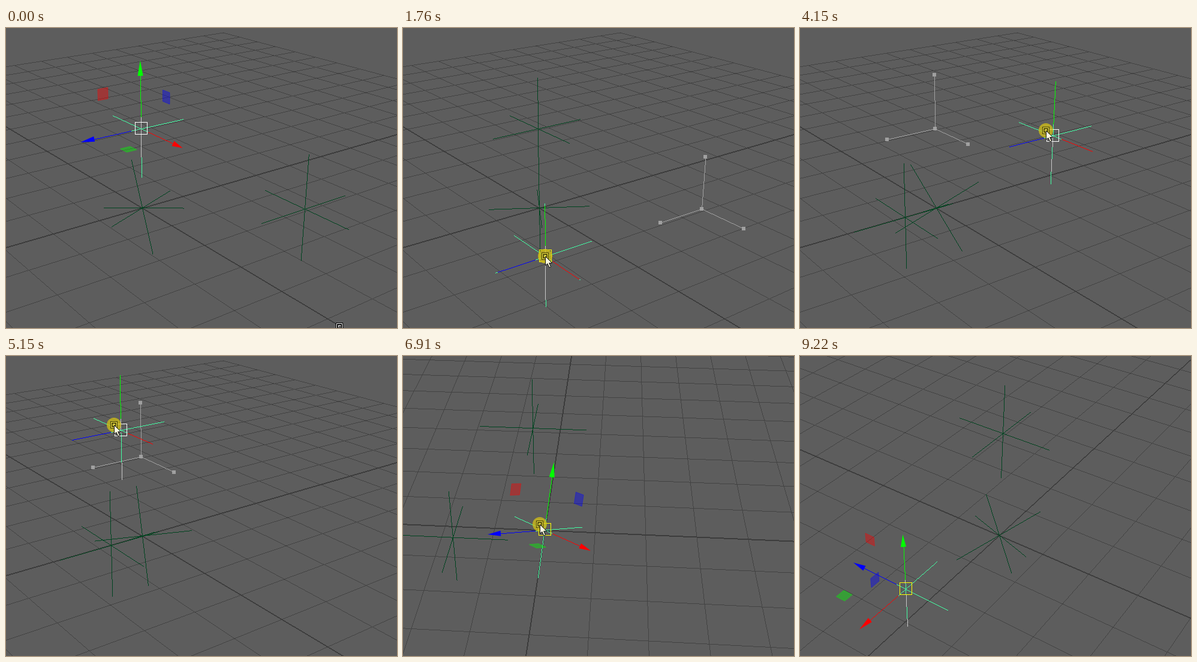
An HTML page with a canvas that plays this animation: 652x501 px, repeating every 9.6 s.

```html
<!DOCTYPE html>
<html>
<head>
<meta charset="utf-8">
<style>
html, body { margin: 0; width: 100%; height: 100%; overflow: hidden; background: #5d5d5d; }
canvas { display: block; }
</style>
</head>
<body>
<canvas id="stage" width="652" height="501"></canvas>
<script>
const W = 652, H = 501, LOOP = 9600, STEP = 76.8;
const FOCAL = 1325, CX = 260, CY = 250, DIST = 15.8, NEAR = 0.5, GIZMO = 0.0875;
const ctx = document.getElementById('stage').getContext('2d');
const image = ctx.createImageData(W, H);
const pixels = new Uint32Array(image.data.buffer);

const rgb = (r, g, b) => (255 << 24 | b << 16 | g << 8 | r) >>> 0;
const BACK = rgb(93, 93, 93), GRID = rgb(67, 67, 67), AXIS = rgb(60, 60, 60);
const DORMANT = rgb(0, 68, 32), ACTIVE = rgb(67, 255, 163), PALE = rgb(200, 200, 200);
const WHITE = rgb(255, 255, 255), GHOST = rgb(160, 160, 160);
const AXIS_RGB = ['255,0,0', '0,255,0', '0,0,255'];
const AXIS_PIXEL = [rgb(255, 0, 0), rgb(0, 255, 0), rgb(0, 0, 255)];
const WORLD = [[1, 0, 0], [0, 1, 0], [0, 0, 1]];
const ORIGIN = [0, 0, 0];

// Time, yaw, pitch, screen position of the world origin
const CAMERA = [
  [5800, 35.5, 22.2, 227, 300], [6370, 11.45, 33, 213, 293], [6560, 8, 33.4, 216, 293],
  [6640, 8, 33.4, 216, 293], [7420, -35.7, 36.2, 287, 284], [7680, -35.7, 36.2, 287, 284],
  [8000, -35.7, 36.2, 332, 299]
];
const TARGET_PATH = [
  [910, 498, 302], [1010, 465, 310], [1200, 300, 345], [1400, 102, 370], [1600, 180, 390],
  [1760, 282, 368], [1850, 322, 338], [2100, 366, 250], [2300, 300, 170], [2550, 150, 200],
  [2700, 108, 270], [2840, 175, 316]
];
const TARGET_PATH_2 = [
  [8300, 158, 260], [8500, 146, 262], [8700, 150, 330], [8900, 176, 389]
];
const UP_PATH = [
  [3880, 225, 168], [4000, 424, 180], [4130, 424, 180], [4460, 95, 130], [4600, 95, 130],
  [4870, 362, 105], [5150, 191, 124], [5350, 184, 134], [5520, 191, 127]
];
const CURSOR_PATH = [
  [0, 556, 498], [640, 498, 302], [900, 498, 302], [3080, 175, 316], [3600, 214, 159],
  [3880, 214, 159], [5550, 180, 118], [5750, 250, 268], [5820, 250, 268], [6370, 353, 288],
  [6500, 362, 290], [6630, 190, 270], [7420, 320, 309], [7680, 320, 309], [8000, 365, 324],
  [8130, 158, 260], [8300, 158, 260], [8960, 176, 389], [9220, 600, 530]
];
const PRESSED = [[640, 720], [900, 3080], [3700, 3780], [3880, 5550], [5800, 6500],
  [6620, 7440], [7600, 8020], [8130, 8200], [8300, 8960]];

const within = (t, a, b) => t >= a && t < b;
const add = (p, q, k = 1) => p.map((v, i) => v + q[i] * k);
const dot = (p, q) => p[0] * q[0] + p[1] * q[1] + p[2] * q[2];
const unit = p => p.map(v => v / Math.hypot(...p));
const cross = (p, q) => [p[1] * q[2] - p[2] * q[1], p[2] * q[0] - p[0] * q[2], p[0] * q[1] - p[1] * q[0]];

// Monotone cubic interpolation through timed keys
function track(keys, t) {
  const last = keys.length - 1;
  if (t <= keys[0][0]) return keys[0].slice(1);
  if (t >= keys[last][0]) return keys[last].slice(1);
  const i = keys.findIndex(k => k[0] > t) - 1;
  const span = keys[i + 1][0] - keys[i][0], u = (t - keys[i][0]) / span;
  const slope = (n, c) => (keys[n + 1][c] - keys[n][c]) / (keys[n + 1][0] - keys[n][0]);
  const tangent = (n, c) => {
    if (n === 0 || n === last) return 0;
    const a = slope(n - 1, c), b = slope(n, c);
    return a * b > 0 ? 2 * a * b / (a + b) : 0;
  };
  return keys[i].slice(1).map((a, n) => {
    const c = n + 1, b = keys[i + 1][c];
    const ease = u * u * (3 - 2 * u);
    return a + (b - a) * ease + span * u * (1 - u) *
      (tangent(i, c) * (1 - u) - tangent(i + 1, c) * u);
  });
}

function cameraAt(t) {
  const [yaw, pitch, x, y] = track(CAMERA, t), rad = Math.PI / 180;
  return {
    cy: Math.cos(yaw * rad), sy: Math.sin(yaw * rad),
    cp: Math.cos(pitch * rad), sp: Math.sin(pitch * rad),
    ox: (x - CX) / FOCAL * DIST, oy: (CY - y) / FOCAL * DIST
  };
}

function toView(cam, [x, y, z]) {
  const ahead = -cam.cy * x - cam.sy * z;
  return [cam.sy * x - cam.cy * z + cam.ox,
    cam.sp * ahead + cam.cp * y + cam.oy,
    cam.cp * ahead - cam.sp * y + DIST];
}

const toScreen = ([x, y, d]) => [CX + FOCAL * x / d, CY - FOCAL * y / d];
const project = (cam, p) => toScreen(toView(cam, p));

function unproject(cam, [sx, sy], depth) {
  const right = (sx - CX) / FOCAL * depth - cam.ox;
  const up = (CY - sy) / FOCAL * depth - cam.oy;
  const front = depth - DIST;
  const ahead = cam.cp * front + cam.sp * up;
  return [-cam.cy * ahead + cam.sy * right, cam.cp * up - cam.sp * front,
    -cam.sy * ahead - cam.cy * right];
}

const HOME = cameraAt(0), CLOSE = cameraAt(LOOP);
const targetAt = t => t < 8300
  ? unproject(HOME, track(TARGET_PATH, t), 13.7)
  : unproject(CLOSE, track(TARGET_PATH_2, t), 15.235);
const upAt = t => unproject(HOME, track(UP_PATH, t), 15.15);

function put(x, y, color) {
  if (x >= 0 && y >= 0 && x < W && y < H) pixels[y * W + x] = color;
}

// Aliased line; even and odd pixel columns may differ in tone
function line([x0, y0], [x1, y1], even, odd = even) {
  const steep = Math.abs(y1 - y0) > Math.abs(x1 - x0);
  if (steep) [x0, y0, x1, y1] = [y0, x0, y1, x1];
  if (x0 > x1) [x0, y0, x1, y1] = [x1, y1, x0, y0];
  const k = (y1 - y0) / (x1 - x0 || 1);
  const end = Math.min(steep ? H - 1 : W - 1, Math.round(x1));
  for (let a = Math.max(0, Math.round(x0)); a <= end; a++) {
    const b = Math.round(y0 + k * (a - x0));
    const x = steep ? b : a;
    put(x, steep ? a : b, x & 1 ? odd : even);
  }
}

function segment(cam, p, q, color, thick) {
  let a = toView(cam, p), b = toView(cam, q);
  if (a[2] < NEAR && b[2] < NEAR) return;
  if (a[2] > b[2]) [a, b] = [b, a];
  if (a[2] < NEAR) a = add(a, add(b, a, -1), (NEAR - a[2]) / (b[2] - a[2]));
  const s = toScreen(a), e = toScreen(b);
  const dx = Math.abs(e[0] - s[0]), dy = Math.abs(e[1] - s[1]);
  line(s, e, color, color === ACTIVE && dy > 12 * dx ? PALE : color);
  if (thick) {
    const shift = dy > dx ? [1, 0] : [0, 1];
    line(add(s, shift), add(e, shift), color);
  }
}

function grid(cam) {
  const pair = (i, color, thick) => {
    segment(cam, [i, 0, -12], [i, 0, 12], color, thick);
    segment(cam, [-12, 0, i], [12, 0, i], color, thick);
  };
  for (let i = -12; i <= 12; i++) if (i) pair(i, GRID);
  pair(0, AXIS, true);
}

function locator(cam, p, basis, color) {
  for (const axis of basis) segment(cam, add(p, axis, -1), add(p, axis), color);
}

const gizmoSize = (cam, p) => GIZMO * toView(cam, p)[2];

function gizmoLines(cam, p, basis) {
  const size = gizmoSize(cam, p);
  basis.forEach((axis, i) =>
    segment(cam, add(p, axis, size * 0.18), add(p, axis, size * 0.8), AXIS_PIXEL[i]));
}

function ghostLines(cam, p) {
  const size = gizmoSize(cam, p);
  for (const axis of WORLD) segment(cam, p, add(p, axis, size * 0.8), GHOST);
}

function ghostKnobs(cam, p) {
  const size = gizmoSize(cam, p);
  ctx.fillStyle = '#a0a0a0';
  for (const axis of [ORIGIN, ...WORLD]) {
    const [x, y] = project(cam, add(p, axis, size * 0.8)).map(Math.round);
    ctx.fillRect(x - 3, y - 3, 6, 6);
  }
}

function polygon(points) {
  ctx.beginPath();
  points.forEach(([x, y]) => ctx.lineTo(x, y));
  ctx.closePath();
}

function gizmoShapes(cam, p, basis, dragging, boxColor) {
  const size = gizmoSize(cam, p);
  ctx.lineWidth = 1;
  if (!dragging) basis.forEach((axis, i) => {
    const u = basis[(i + 1) % 3], v = basis[(i + 2) % 3];
    const corner = (a, b) => project(cam, add(add(p, u, a * size), v, b * size));
    polygon([corner(0.54, 0.54), corner(0.7, 0.54), corner(0.7, 0.7), corner(0.54, 0.7)]);
    ctx.fillStyle = ctx.strokeStyle = `rgba(${AXIS_RGB[i]},0.4)`;
    ctx.fill();
    ctx.stroke();

    const base = project(cam, add(p, axis, size * 0.78)), tip = project(cam, add(p, axis, size));
    const dx = tip[0] - base[0], dy = tip[1] - base[1], k = 4.5 / (Math.hypot(dx, dy) || 1);
    polygon([tip, [base[0] - dy * k, base[1] + dx * k], [base[0] + dy * k, base[1] - dx * k]]);
    ctx.fillStyle = `rgb(${AXIS_RGB[i]})`;
    ctx.fill();
  });
  const [x, y] = project(cam, p).map(Math.round);
  ctx.strokeStyle = boxColor;
  ctx.strokeRect(x - 9.5, y - 10.5, 20, 20);
}

function cursor([cx, cy], pressed) {
  const x = Math.round(cx), y = Math.round(cy);
  if (pressed) {
    ctx.fillStyle = 'rgba(212,194,20,0.75)';
    ctx.beginPath();
    ctx.arc(x, y, 12, 0, 7);
    ctx.fill();
  }
  const square = (r, color) => {
    ctx.strokeStyle = color;
    ctx.strokeRect(x - r + 0.5, y - r + 0.5, 2 * r - 1, 2 * r - 1);
  };
  const light = pressed ? '#f2e648' : '#ffffff';
  ctx.lineWidth = 1;
  square(6, pressed ? '#3c3805' : '#000');
  square(5, light);
  square(4, pressed ? '#6b6210' : '#000');
  square(3, pressed ? '#3c3805' : '#000');
  square(2, light);
  polygon([[0, 0], [0, 15], [3.5, 12], [6.5, 18.5], [9, 17.5], [6.2, 11], [11, 11]]
    .map(([a, b]) => [x + a + 0.5, y + b + 0.5]));
  ctx.fillStyle = pressed ? '#fffce0' : '#fff';
  ctx.strokeStyle = '#111';
  ctx.fill();
  ctx.stroke();
}

function selectionAt(t) {
  if (t < 690) return 'up';
  if (t < 3740) return 'target';
  if (t < 5620) return 'up';
  if (t < 6560) return 'target';
  return t < 8150 ? 'aimer' : 'target';
}

function draw(t) {
  const cam = cameraAt(t), target = targetAt(t), up = upAt(t);
  const aim = unit(target), upright = unit(add(up, aim, -dot(up, aim)));
  const parts = {
    aimer: { pos: ORIGIN, basis: [cross(upright, aim), upright, aim] },
    up: { pos: up, basis: WORLD },
    target: { pos: target, basis: WORLD }
  };
  const selected = selectionAt(t), chosen = parts[selected];
  const dragStart = within(t, 910, 3080) ? targetAt(0)
    : within(t, 3890, 5550) ? upAt(0)
    : within(t, 8310, 8960) ? targetAt(8300) : null;

  pixels.fill(BACK);
  grid(cam);
  for (const name in parts) {
    if (name === selected) continue;
    const color = name === 'aimer' && within(t, 5620, 6560) ? WHITE : DORMANT;
    locator(cam, parts[name].pos, parts[name].basis, color);
  }
  if (dragStart) ghostLines(cam, dragStart);
  locator(cam, chosen.pos, chosen.basis, ACTIVE);
  gizmoLines(cam, chosen.pos, chosen.basis);
  ctx.putImageData(image, 0, 0);

  if (dragStart) ghostKnobs(cam, dragStart);
  const pale = t < 690 || within(t, 2860, 5620);
  gizmoShapes(cam, chosen.pos, chosen.basis, dragStart, pale ? '#fff' : '#ffff00');

  const grip = selected === 'up' ? [-11, -9] : [0, 0];
  const pointer = dragStart ? add(project(cam, chosen.pos), grip) : track(CURSOR_PATH, t);
  cursor(pointer, PRESSED.some(([a, b]) => within(t, a, b)));
}

const start = performance.now();
function frame(now) {
  const t = Math.max(0, now - start) % LOOP;
  draw(Math.floor((t + 5) / STEP) * STEP % LOOP);
  requestAnimationFrame(frame);
}
draw(0);
requestAnimationFrame(frame);
</script>
</body>
</html>
```
